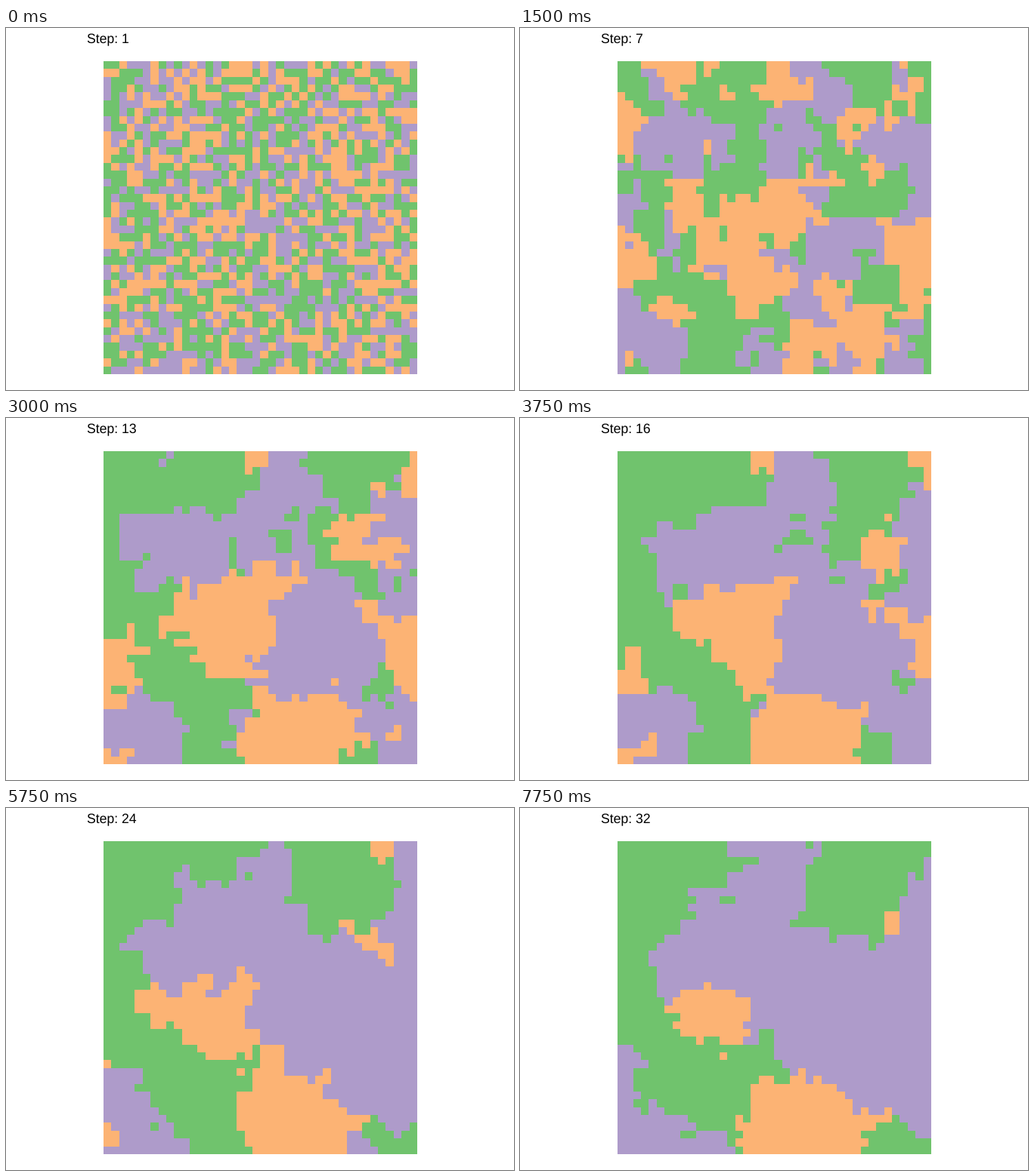
Recreate the animation shown at these times as a matplotlib script. Size 672 px wide and 480 px high, loop 8000 ms.

```python
import numpy as np
import matplotlib.pyplot as plt
from matplotlib.animation import FuncAnimation
from matplotlib.colors import ListedColormap

WIDTH, HEIGHT, DPI = 672, 480, 96
SIZE = 40
STEPS = 32
INTERVAL = 250
LEFT, TOP, SIDE = 128.5, 44.2, 415
COLORS = ["#70c36d", "#ae9bca", "#fcb374"]
GREEN, PURPLE, ORANGE = range(3)
SHARPNESS = 1.6   # how strongly a cell prefers the local majority
PULL = 1.1        # how strongly a centre favours its state
RAMP = 12         # steps until the centres act fully

# State, column, row and radius of the lasting clusters
CENTRES = [
    (GREEN, 6, 6, 5),
    (GREEN, 30, 5, 4),
    (GREEN, 9, 27, 3),
    (PURPLE, 12, 12, 7),
    (PURPLE, 28, 24, 7),
    (ORANGE, 25, 35, 5),
    (ORANGE, 11, 21, 4),
]

rows, cols = np.mgrid[:SIZE, :SIZE]


def attraction():
    """Pull towards each state for every cell."""
    field = np.zeros((3, SIZE, SIZE))
    for state, x, y, radius in CENTRES:
        dist = np.hypot(cols - x, rows - y) / radius
        field[state] += np.exp(-dist ** 2)
    return field


def neighbour_counts(grid):
    """Number of the four direct neighbours in each state."""
    cells = np.pad(np.eye(3)[grid], ((1, 1), (1, 1), (0, 0)))
    total = (cells[:-2, 1:-1] + cells[2:, 1:-1]
             + cells[1:-1, :-2] + cells[1:-1, 2:])
    return total.transpose(2, 0, 1)


def advance(grid, pull, rng):
    """Every cell takes on a neighbour's state, common ones more often."""
    grid = grid.copy()
    for parity in range(2):
        mask = (rows + cols) % 2 == parity
        limits = np.cumsum(neighbour_counts(grid) ** SHARPNESS * pull, axis=0)
        draw = rng.random((SIZE, SIZE)) * limits[-1]
        choice = (draw >= limits[:2]).sum(axis=0)
        grid[mask] = choice[mask]
    return grid


def simulate():
    rng = np.random.default_rng(11)
    field = attraction()
    history = [rng.integers(0, 3, (SIZE, SIZE))]
    for step in range(1, STEPS):
        pull = np.exp(PULL * min(1, step / RAMP) * field)
        history.append(advance(history[-1], pull, rng))
    return history


history = simulate()

plt.rcParams["font.family"] = "Liberation Sans"
plt.rcParams["text.hinting"] = "none"
fig = plt.figure(figsize=(WIDTH / DPI, HEIGHT / DPI), dpi=DPI, facecolor="white")
ax = fig.add_axes([LEFT / WIDTH, 1 - (TOP + SIDE) / HEIGHT,
                   SIDE / WIDTH, SIDE / HEIGHT])
ax.axis("off")
image = ax.imshow(history[0], cmap=ListedColormap(COLORS), vmin=0, vmax=2,
                  interpolation="nearest", aspect="auto")
title = fig.text(107.5 / WIDTH, 1 - 20 / HEIGHT, "Step: 1", fontsize=13.2,
                 color="black", ha="left", va="baseline")


def update(frame):
    image.set_data(history[frame])
    title.set_text(f"Step: {frame + 1}")
    return image, title


anim = FuncAnimation(fig, update, frames=STEPS, interval=INTERVAL,
                     repeat=True, repeat_delay=0, blit=False)
plt.show()
```
